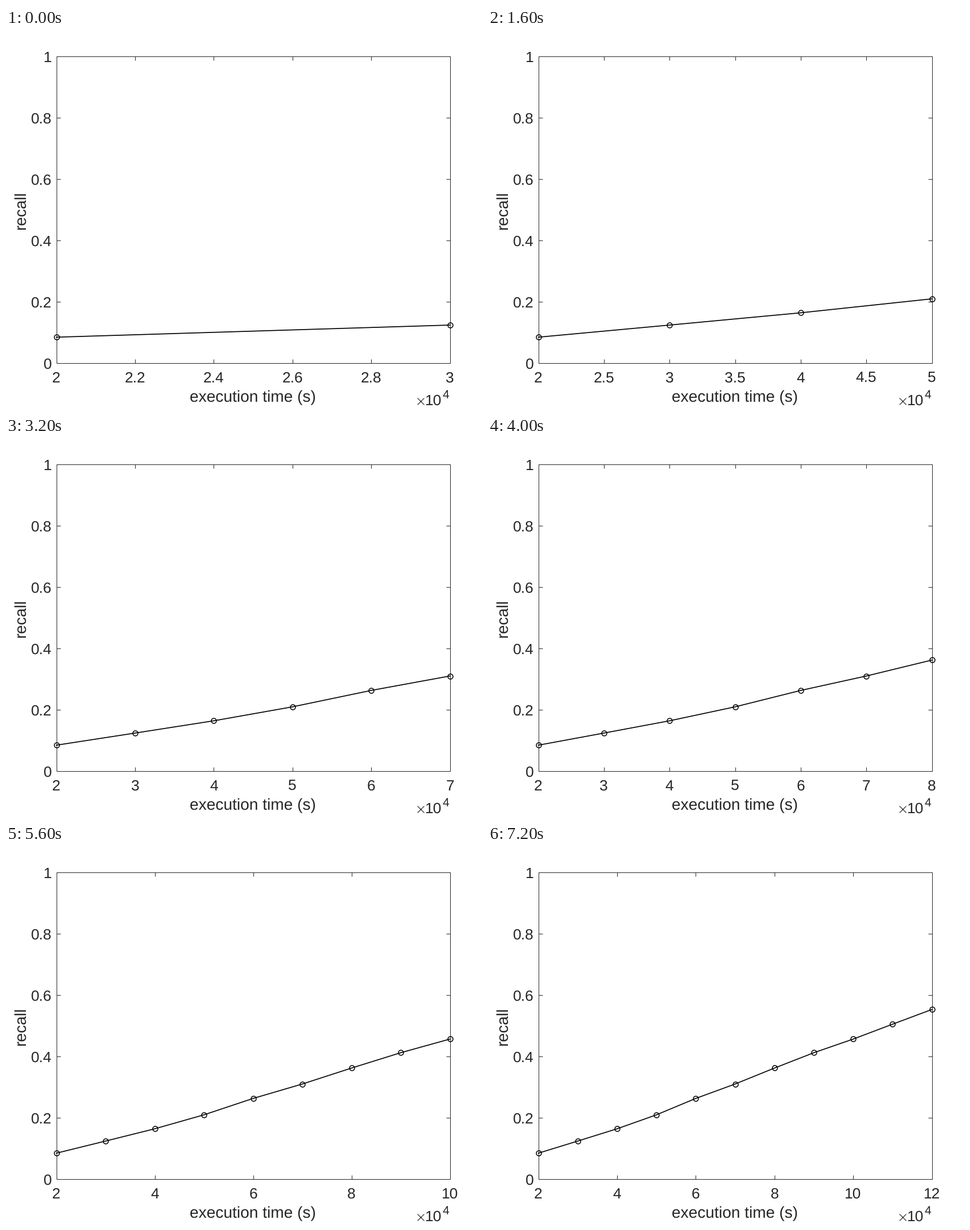
A matplotlib script for the animation above (8000 ms loop, 837 by 669 pixels).

```python
import matplotlib.pyplot as plt
import numpy as np
from matplotlib.animation import FuncAnimation

W, H, DPI = 837, 669, 100
LEFT, RIGHT, TOP, BOTTOM = 88, 780, 50, 590
INK = "#262626"
TICK = 7
TICK_FONT, LABEL_FONT, EXP_FONT = 26.4, 28.1, 21.2
RECALL = [0.0855, 0.125, 0.165, 0.2105, 0.264, 0.311,
          0.363, 0.413, 0.4575, 0.506, 0.554]

plt.rcParams["font.family"] = "Liberation Sans"
plt.rcParams["text.hinting"] = "none"
plt.rcParams["toolbar"] = "None"


def pt(px):
    return px * 72 / DPI


# The small surplus keeps the pixel size from being rounded down
fig = plt.figure(figsize=((W + 0.01) / DPI, (H + 0.01) / DPI), dpi=DPI,
                 facecolor="white")
ax = fig.add_axes([0, 0, 1, 1])
ax.set_xlim(-0.5, W - 0.5)
ax.set_ylim(H - 0.5, -0.5)
ax.axis("off")


def stroke(xs, ys):
    return ax.plot(xs, ys, color=INK, lw=pt(1), solid_capstyle="butt")[0]


def label(x, y, text, size=TICK_FONT, ha="center", **kw):
    return ax.text(x, y, text, fontsize=pt(size), color=INK, ha=ha,
                   va="baseline", **kw)


def to_y(value):
    return BOTTOM - value * (BOTTOM - TOP)


def tick_step(span):
    if span == 1:
        return 0.2
    if span <= 3:
        return 0.5
    return 1 if span <= 7 else 2


# Fixed frame, vertical scale and captions
stroke([LEFT, RIGHT, RIGHT, LEFT, LEFT], [BOTTOM, BOTTOM, TOP, TOP, BOTTOM])
for v in np.linspace(0, 1, 6):
    y = to_y(v)
    stroke([LEFT, LEFT + TICK], [y, y])
    stroke([RIGHT - TICK, RIGHT], [y, y])
    label(80, y + 9.5, f"{v:g}", ha="right")

label(433.5, 657.5, "execution time (s)", LABEL_FONT)
label(33, 321, "recall", LABEL_FONT, rotation=90, rotation_mode="anchor")
ax.plot([723.5, 734.5, np.nan, 723.5, 734.5],
        [651.5, 662.5, np.nan, 662.5, 651.5], color=INK, lw=pt(1.2))
label(736, 663, "10", ha="left")
label(767, 651.5, "4", EXP_FONT, ha="left")

curve, = ax.plot([], [], "-o", color="black", lw=pt(1.7), ms=pt(9),
                 mfc="none", mec="black", mew=pt(1.5), zorder=5)
scale = []


def draw(i):
    while scale:
        scale.pop().remove()
    end = 3 + i
    span = end - 2

    def to_x(t):
        return LEFT + (t - 2) / span * (RIGHT - LEFT)

    for t in np.arange(2, end + 0.01, tick_step(span)):
        x = to_x(t)
        scale.append(label(x, 623.5, f"{t:g}"))
        scale.append(stroke([x, x], [BOTTOM - TICK, BOTTOM]))
        scale.append(stroke([x, x], [TOP, TOP + TICK]))

    times = np.arange(2, end + 1)
    curve.set_data(to_x(times), to_y(np.array(RECALL[:len(times)])))
    return [curve, *scale]


anim = FuncAnimation(fig, draw, frames=10, interval=800, repeat=True,
                     repeat_delay=0, init_func=lambda: draw(0))
plt.show()
```
